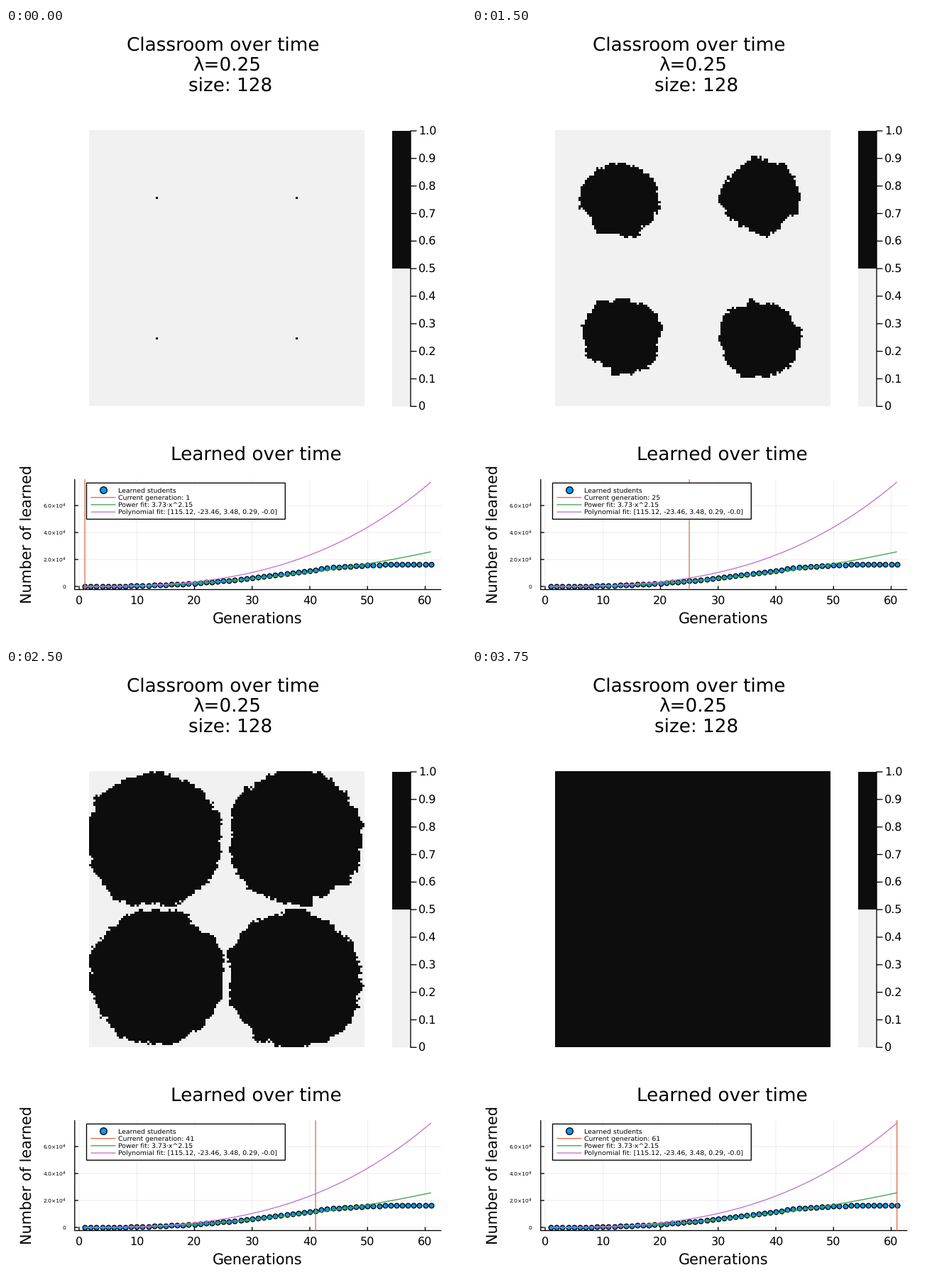
Animation of 648 by 864 pixels, one loop 3810 ms. Source, as a matplotlib script:

```python
import numpy as np
import matplotlib.pyplot as plt
from matplotlib.animation import FuncAnimation
from matplotlib.patches import Rectangle

W, H, DPI = 648, 864, 100
FRAMES, INTERVAL = 127, 30
GENERATIONS, GEN_MS = 61, 62.5
N = 128
LEFT, RIGHT, TOP, BOTTOM = 117.4, 505.4, 145, 533.3
CELL = (RIGHT - LEFT) / N
LIGHT, DARK = "#f1f1f1", "#0d0d0d"
BLUE, ORANGE, GREEN, PURPLE = "#009af9", "#e26f46", "#3da44d", "#c371d2"

# Column, row and the direction (degrees) in which the patch leans.
SEEDS = [(31, 31, 200), (96, 31, 110), (31, 96, 100), (96, 96, 200)]
LEAN = 4

plt.rcParams["font.family"] = "DejaVu Sans"
plt.rcParams["text.hinting"] = "none"
plt.rcParams["path.snap"] = False


def neighbours(grid):
    """Sum of the eight cells around each cell."""
    p = np.pad(grid.astype(float), 1)
    total = sum(p[i:i + N, j:j + N] for i in range(3) for j in range(3))
    return total - grid


def rough(rng, passes):
    """Random field of unit spread, softened by box blurs."""
    field = rng.standard_normal((N, N))
    for _ in range(passes):
        field = (neighbours(field) + field) / 9
    return field / field.std()


def radius(gen):
    """Mean patch radius in pixels: a slow start, then a steady front."""
    age = gen - 1
    return 0.5 + 2.55 * age - 6.5 * (1 - np.exp(-age / 5))


def grow():
    """Learned cells for every generation."""
    rows, cols = np.mgrid[0:N, 0:N]
    dists, leans = [], []
    for cx, cy, angle in SEEDS:
        dx, dy = cols - cx, rows - cy
        dists.append(CELL * np.hypot(dx, dy))
        leans.append(LEAN * np.cos(np.arctan2(-dy, dx) - np.radians(angle)))
    nearest = np.min(dists, axis=0)
    rng = np.random.default_rng(7)
    noise = 1.6 * rough(rng, 0) + 2 * rough(rng, 2) + 2.5 * rough(rng, 12)
    fade = np.minimum(1, nearest / 24)
    noise = np.clip(noise, -7, 7) * fade
    cost = np.min([d - s * fade for d, s in zip(dists, leans)], axis=0) - noise

    grid = nearest == 0
    history = [grid]
    for gen in range(2, GENERATIONS + 1):
        near = neighbours(grid)
        grid = grid | ((cost < radius(gen)) & (near > 0)) | (near >= 6)
        history.append(grid)
    return history


def px(size):
    return size * 72 / DPI


history = grow()
learned = np.array([g.sum() for g in history])

fig = plt.figure(figsize=(W / DPI, H / DPI), dpi=DPI, facecolor="white")
ax = fig.add_axes([0, 0, 1, 1])


def label(x, y, text, size, ha="left", z=5, **kw):
    return ax.text(x, y, text, fontsize=px(size), ha=ha, va="baseline",
                   color="black", zorder=z, **kw)


def line(x, y, color="black", width=1.33, z=3, **kw):
    return ax.plot(x, y, color=color, lw=px(width), zorder=z,
                   solid_capstyle="butt", **kw)[0]


def box(x0, y0, x1, y1, color, z=1, **kw):
    ax.add_patch(Rectangle((x0, y0), x1 - x0, y1 - y0, facecolor=color,
                           zorder=z, **kw))


def dots(x, y, size, z):
    ax.plot(x, y, "o", ms=px(size), mfc=BLUE, mec="black", mew=px(1.33),
            zorder=z)


def shade(grid):
    tones = np.array([[0xF1] * 3, [0x0D] * 3], np.uint8)
    return tones[grid.astype(int)]


# Classroom heatmap
label(169.8, 32.2, "Classroom over time", 26.3)
label(263, 61, "λ=0.25", 26.3)
label(256.8, 90, "size: 128", 26.3)
image = ax.imshow(shade(history[0]), extent=(LEFT, RIGHT, BOTTOM, TOP),
                  interpolation="nearest", aspect="auto", zorder=1)

# Colour bar
middle = (TOP + BOTTOM) / 2
box(544, TOP, 570, middle, DARK, lw=0)
box(544, middle, 570, BOTTOM, LIGHT, lw=0)
line([570, 570], [TOP - 0.6, BOTTOM + 0.6])
for i in range(11):
    y = BOTTOM - i * (BOTTOM - TOP) / 10
    line([570, 578.5], [y, y])
    label(581, y + 5.8, f"{i / 10:.1f}" if i else "0", 16)

# Growth chart
X0, X1, Y0, Y1 = 96.8, 613.3, 791.5, 636


def gx(gen):
    return 103 + 8.125 * gen


def gy(count):
    return 787.1 - 0.0019 * count


label(232.4, 610, "Learned over time", 26.3)
label(291.2, 839.3, "Generations", 20.8)
label(37, 811, "Number of learned", 20.8, rotation=90, rotation_mode="anchor")

for gen in range(0, 61, 10):
    x = gx(gen)
    line([x, x], [Y0, Y1], width=0.7, z=1, alpha=0.1)
    line([x, x], [Y0, Y0 - 5])
    label(x, 812.8, str(gen), 16, "center")
for step in range(4):
    y = gy(2e4 * step)
    line([X0, X1], [y, y], width=0.7, z=1, alpha=0.1)
    line([X0, X0 + 5], [y, y])
    if step:
        label(52.5, y + 3.2, f"{2 * step}.0×10", 7.5)
        label(80.2, y + 0.4, "4", 5.6)
    else:
        label(84.4, y + 2.9, "0", 7.5, "right")
line([X0, X0], [Y0 + 0.6, Y1])
line([X0, X1], [Y0, Y0])

gens = np.arange(1, GENERATIONS + 1)
dots(gx(gens), gy(learned), 6.7, 3.1)
marker = line([gx(1)] * 2, [Y0, Y1], ORANGE, 1.33, 3.2)
line(gx(gens), gy(3.73 * gens ** 2.15), GREEN, 1.33, 3.3)
poly = 115.12 - 23.46 * gens + 3.48 * gens ** 2 + 0.29 * gens ** 3
line(gx(gens), gy(poly), PURPLE, 1.33, 3.4)

# Legend
box(113.5, 641.3, 393.3, 692.3, "white", 6, edgecolor="black", lw=px(1.33))
entries = [
    (None, "Learned students"),
    (ORANGE, "Current generation: 1"),
    (GREEN, "Power fit: 3.73·x^2.15"),
    (PURPLE, "Polynomial fit: [115.12, -23.46, 3.48, 0.29, -0.0]"),
]
names = []
for i, (color, text) in enumerate(entries):
    y = 651.4 + 10.25 * i
    if color:
        line([119.5, 154.5], [y, y], color, 1.33, 7)
    else:
        dots([137], [y], 9.6, 7)
    names.append(label(158.3, y + 3.1, text, 9.37, z=7))
counter = names[1]

ax.set_xlim(0, W)
ax.set_ylim(H, 0)
ax.axis("off")


def update(frame):
    elapsed = frame * INTERVAL + 22.5
    index = min(GENERATIONS - 1, int(elapsed / GEN_MS))
    image.set_data(shade(history[index]))
    marker.set_xdata([gx(index + 1)] * 2)
    counter.set_text(f"Current generation: {index + 1}")
    return image, marker, counter


anim = FuncAnimation(fig, update, frames=FRAMES, interval=INTERVAL,
                     repeat=True, repeat_delay=0, blit=False)
plt.show()
```
